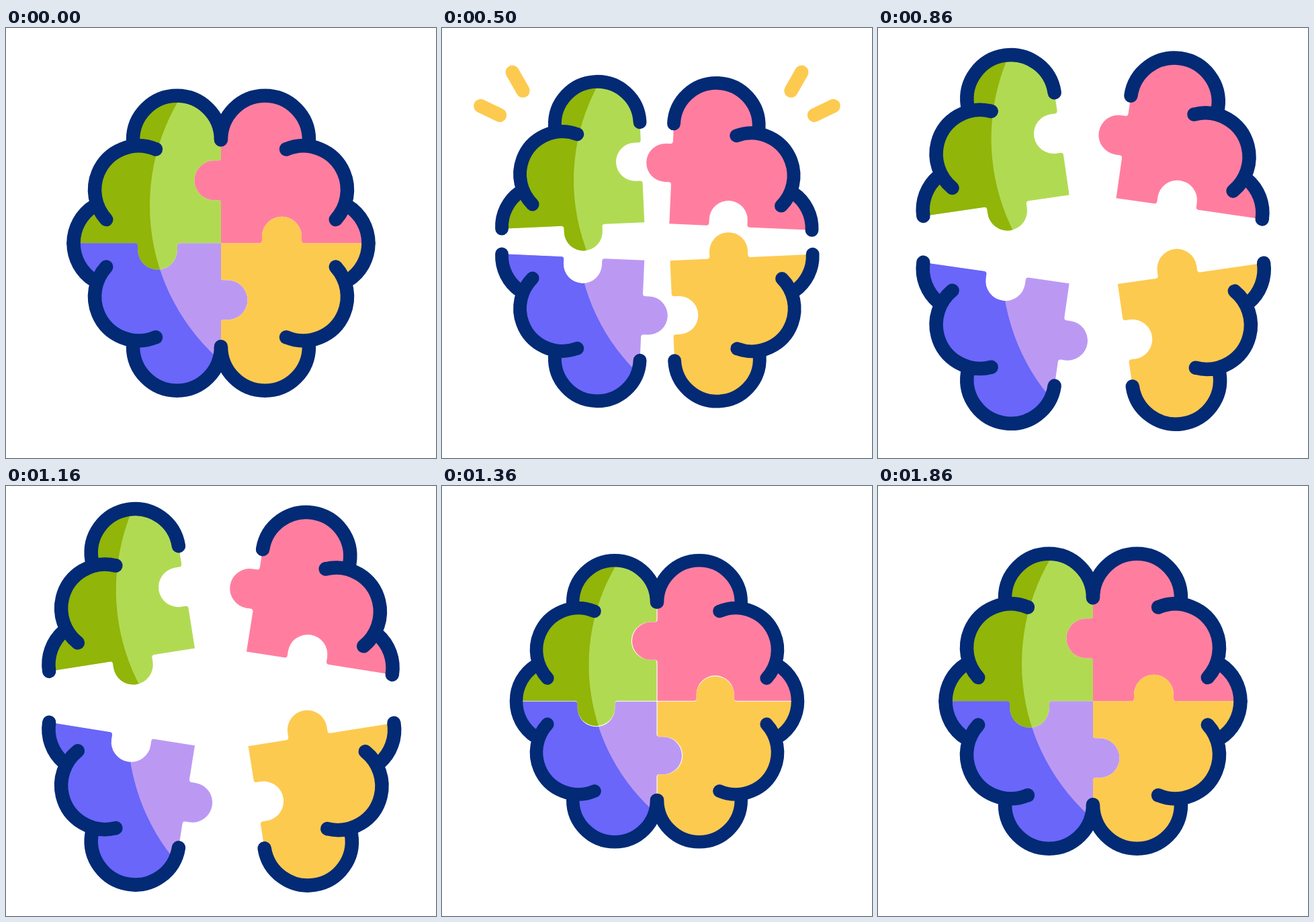
Recreate the animation shown at these times as an HTML page with a canvas. Size 640 by 640 pixels, loop 2200 ms.

```html
<!DOCTYPE html>
<html lang="en">
<head>
<meta charset="utf-8">
<title>Puzzle brain</title>
<style>
  html, body { margin: 0; width: 100%; height: 100%; overflow: hidden; background: #fff; }
  canvas { display: block; width: 100vw; height: 100vh; }
</style>
</head>
<body>
<canvas id="stage"></canvas>
<script>
const SIZE = 640, LOOP = 2200, STEP = 20;
const NAVY = '#032a75', YELLOW = '#fdca50';
const R = 65.5, KNOB = 29.5;

const canvas = document.getElementById('stage');
const ctx = canvas.getContext('2d');
const ratio = Math.max(1, window.devicePixelRatio || 1);
canvas.width = canvas.height = SIZE * ratio;

// Tracks are [time, value] keys; a third entry makes the way to that key linear.
const SCALE = [[200, 1], [430, .95], [605, 1], [1180, 1], [1345, .951], [1590, 1.03], [1840, 1]];
const MOVE = [[385, 0], [605, .8335], [1180, 1.006, 1], [1345, .012], [1440, 0]];
const TURN = [[432, 0], [605, .8335], [1180, 1.006, 1], [1345, 0]];
const RAY_END = [[420, 0], [570, 1]];
const RAY_START = [[560, 0], [790, 1]];

function track(keys, t) {
  if (t <= keys[0][0]) return keys[0][1];
  for (let i = 1; i < keys.length; i++) {
    const [t0, v0] = keys[i - 1], [t1, v1, linear] = keys[i];
    if (t < t1) {
      const u = (t - t0) / (t1 - t0);
      return v0 + (v1 - v0) * (linear ? u : u * u * (3 - 2 * u));
    }
  }
  return keys[keys.length - 1][1];
}

// sx, sy: quadrant; shift: full travel; side/base: knob place and direction (1 = hole, -1 = tab)
const PIECES = [
  { sx: -1, sy: -1, shift: [-53.4, -62], side: [93.5, 1], base: [94.5, -1], fill: '#b1da53', shade: '#91b508' },
  { sx: -1, sy: 1, shift: [-53.4, 49], side: [84.5, -1], base: [94.5, 1], fill: '#bb99f3', shade: '#6966f9' },
  { sx: 1, sy: -1, shift: [52.4, -57], side: [93.5, -1], base: [90.5, 1], fill: '#ff7e9f' },
  { sx: 1, sy: 1, shift: [55, 50], side: [84.5, 1], base: [90.5, -1], fill: YELLOW }
];

const angle = (cx, cy, x, y) => Math.atan2(y - cy, x - cx);

// Arc around (cx, cy) between the directions of two points.
function arcBetween(path, cx, cy, x0, y0, x1, y1, back) {
  path.arc(cx, cy, R, angle(cx, cy, x0, y0), angle(cx, cy, x1, y1), back);
}

// All shapes are built in one quadrant with the brain centre at 0,0.
function bodyPath({ side: [a, s], base: [b, d] }) {
  const p = new Path2D();
  arcBetween(p, 154, 0, 219.5, 0, 189, 55.5);
  arcBetween(p, 122.5, 79.5, 184, 57, 131, 144.5);
  p.lineTo(131, 154);
  p.arc(R, 154, R, 0, Math.PI);
  p.lineTo(0, a + KNOB + 4);
  p.quadraticCurveTo(0, a + KNOB, 4 * s, a + KNOB);
  p.arc(10 * s, a, KNOB, Math.PI / 2, -Math.PI / 2, s > 0);
  p.lineTo(4 * s, a - KNOB);
  p.quadraticCurveTo(0, a - KNOB, 0, a - KNOB - 4);
  p.lineTo(0, 0);
  p.lineTo(b - KNOB - 4, 0);
  p.quadraticCurveTo(b - KNOB, 0, b - KNOB, 4 * d);
  p.arc(b, 10 * d, KNOB, Math.PI, 0, d > 0);
  p.lineTo(b + KNOB, 4 * d);
  p.quadraticCurveTo(b + KNOB, 0, b + KNOB + 4, 0);
  p.closePath();
  return p;
}

function outlinePath() {
  const p = new Path2D();
  p.arc(R, 154, R, Math.PI, 0, true);
  p.lineTo(131, 148);
  p.moveTo(97, 140);
  arcBetween(p, 122.5, 79.5, 97, 140, 171, 35, true);
  p.moveTo(219.5, 0);
  arcBetween(p, 154, 0, 219.5, 0, 189, 55.5);
  return p;
}

// Everything outside the big highlight circle.
function shadePath({ sx, sy }) {
  const p = new Path2D();
  p.rect(-400, -400, 800, 800);
  p.moveTo(200 * sx + 306, -56 * sy);
  p.arc(200 * sx, -56 * sy, 306, 0, 2 * Math.PI);
  return p;
}

// The outer semicircle runs through its far side, away from the centre.
const OUTLINE = new Path2D();
OUTLINE.arc(R, 154, R, Math.PI, 0, true);
const lobes = outlinePath();

for (const piece of PIECES) {
  piece.body = bodyPathFor(piece);
  if (piece.shade) piece.dark = shadePath(piece);
}

function bodyPathFor(piece) { return bodyPath(piece); }

function drawPiece(piece, move, turn) {
  const { sx, sy, shift: [dx, dy], body, fill, shade, dark } = piece;
  const px = 100 * sx, py = 100 * sy;
  ctx.save();
  ctx.translate(px + dx * move, py + dy * move);
  ctx.rotate(-sx * sy * turn * Math.PI / 20);
  ctx.translate(-px, -py);
  ctx.scale(sx, sy);
  ctx.fillStyle = fill;
  ctx.fill(body);
  if (shade) {
    ctx.save();
    ctx.clip(body);
    ctx.fillStyle = shade;
    ctx.fill(dark, 'evenodd');
    ctx.restore();
  }
  ctx.strokeStyle = NAVY;
  ctx.stroke(lobes);
  ctx.restore();
}

const RAYS = [[-199.5, -227, -228, -277], [-234, -190.5, -286, -215.5]];

function drawRays(t) {
  const from = track(RAY_START, t), to = track(RAY_END, t);
  if (to <= from) return;
  ctx.strokeStyle = YELLOW;
  for (const side of [1, -1]) {
    for (const [x0, y0, x1, y1] of RAYS) {
      const at = u => [side * (x0 + (x1 - x0) * u), y0 + (y1 - y0) * u];
      ctx.beginPath();
      ctx.moveTo(...at(from));
      ctx.lineTo(...at(to));
      ctx.stroke();
    }
  }
}

function draw(t) {
  ctx.setTransform(ratio, 0, 0, ratio, 0, 0);
  ctx.fillStyle = '#fff';
  ctx.fillRect(0, 0, SIZE, SIZE);
  ctx.translate(SIZE / 2, SIZE / 2 + .3);
  ctx.lineWidth = 20.5;
  ctx.lineCap = ctx.lineJoin = 'round';
  drawRays(t);
  const s = track(SCALE, t), move = track(MOVE, t), turn = track(TURN, t);
  ctx.scale(s, s);
  for (const piece of PIECES) drawPiece(piece, move, -turn * -1);
}

const start = performance.now();
function tick() {
  const t = (performance.now() - start) % LOOP;
  draw(Math.floor(t / STEP) * STEP);
  requestAnimationFrame(tick);
}
tick();
</script>
</body>
</html>
```
